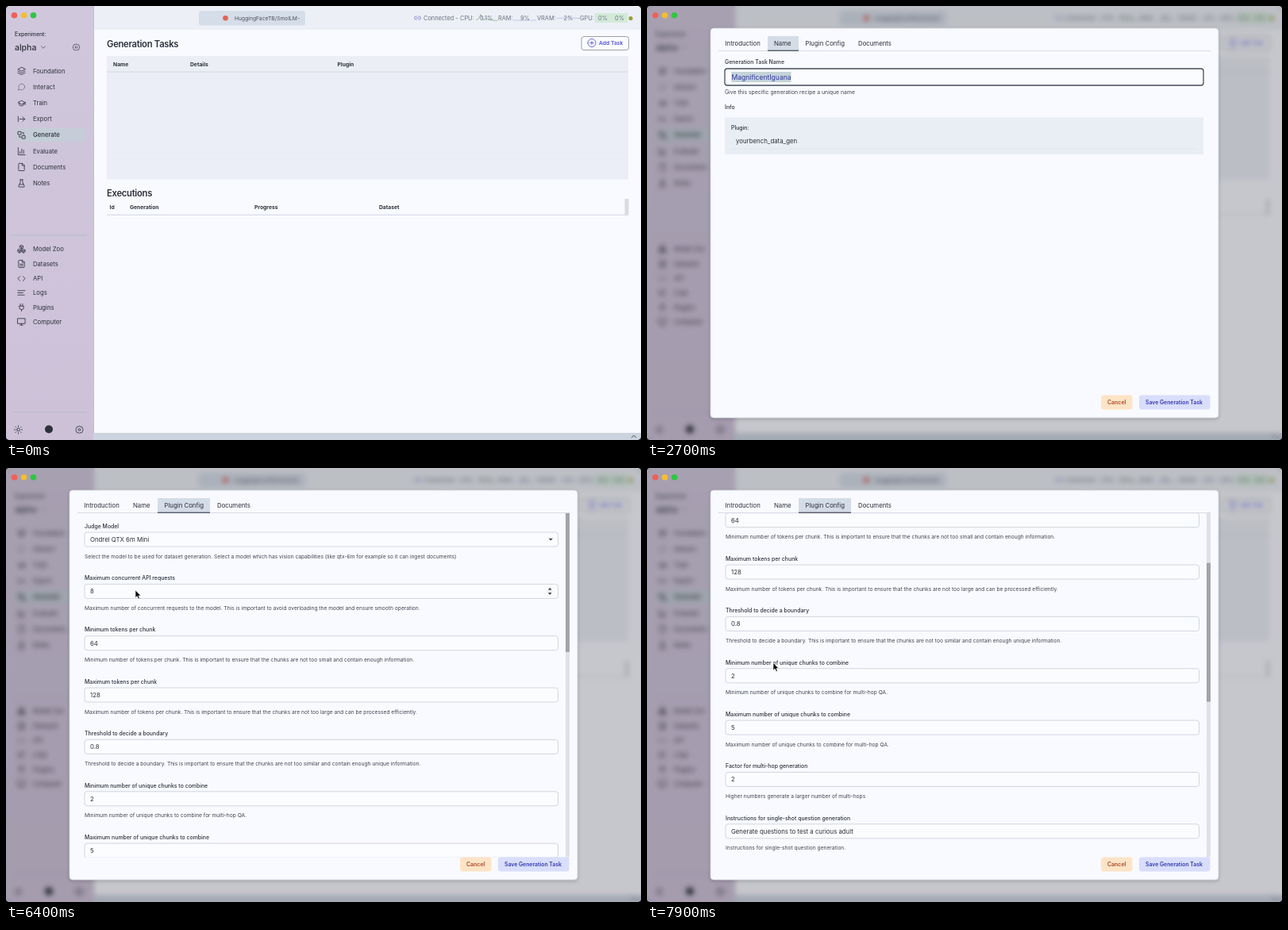
An HTML page that plays this animation: 800x547 px, repeating every 8 s.

```html
<!DOCTYPE html>
<html lang="en">
<head>
<meta charset="utf-8">
<title>Generation tasks</title>
<style>
  html, body { margin: 0; width: 100%; height: 100%; overflow: hidden; background: #26262b; }
  #stage { position: relative; width: 800px; height: 547px; overflow: hidden; border-radius: 5px; }
  #stage > * { position: absolute; left: 0; top: 0; width: 800px; height: 547px; }
  #shade { background: rgba(40, 40, 42, .24); backdrop-filter: blur(3px); }
  text { font-family: Inter, "Open Sans", sans-serif; white-space: pre; }
</style>
</head>
<body>
<div id="stage">
  <svg id="app" viewBox="0 0 800 547"></svg>
  <div id="shade"></div>
  <svg id="modal" viewBox="0 0 800 547"></svg>
  <svg id="top" viewBox="0 0 800 547"></svg>
</div>
<script>
const $ = id => document.getElementById(id);
const INK = '#2c3139', SOFT = '#40464f', MUTED = '#6c7282', PALE = '#9b9fa9';

// Text is placed by the vertical centre of its capitals.
const text = (x, y, s, size = 7.8, weight = 400, fill = INK, more = '') =>
  `<text x="${x}" y="${y + size * .36}" font-size="${size}" font-weight="${weight}" fill="${fill}" ${more}>${s}</text>`;
const label = (x, y, s) => text(x, y, s, 6.92, 500);
const heading = (x, y, s) => text(x, y, s, 11.25, 600, INK, 'letter-spacing="-.28"');
const rect = (x, y, w, h, fill, r = 0, more = '') =>
  `<rect x="${x}" y="${y}" width="${w}" height="${h}" rx="${r}" fill="${fill}" ${more}/>`;
const line = (d, stroke, w = 1, more = '') =>
  `<path d="${d}" fill="none" stroke="${stroke}" stroke-width="${w}" ${more}/>`;
const dot = (x, y, r, fill) => `<circle cx="${x}" cy="${y}" r="${r}" fill="${fill}"/>`;
const icon = (x, y, d, color = INK, k = .46) =>
  `<path transform="translate(${x - 12 * k} ${y - 12 * k}) scale(${k})" d="${d}" fill="none" stroke="${color}" stroke-width="1.8" stroke-linecap="round" stroke-linejoin="round"/>`;
const group = (id, inner, more = '') => `<g id="${id}" ${more}>${inner}</g>`;

const page = 'M14 2H6a2 2 0 0 0-2 2v16a2 2 0 0 0 2 2h12a2 2 0 0 0 2-2V8zM14 2v6h6';
const cube = (x, y) => `M${x} ${y}l4.5 2.5v5l-4.5 2.5-4.5-2.5v-5zM${x - 4.5} ${y + 2.5}l4.5 2.5 4.5-2.5M${x} ${y + 5}v5`;
const gear = 'M12 2l3 2h4l1.5 4 1.5 4-1.5 4-1.5 4h-4l-3 2-3-2H5l-1.5-4L2 12l1.5-4L5 4h4zM9 12a3 3 0 1 0 6 0 3 3 0 1 0-6 0';
const sun = 'M8 12a4 4 0 1 0 8 0 4 4 0 1 0-8 0M12 1v3M12 20v3M1 12h3M20 12h3M4 4l2 2M18 18l2 2M4 20l2-2M18 6l2-2';

const menu = [
  ['Foundation', 82, 'M12 2 2 7l10 5 10-5zM2 12l10 5 10-5M2 17l10 5 10-5'],
  ['Interact', 102, 'M21 11.5a8.4 8.4 0 0 1-9 8.4 8.5 8.5 0 0 1-3.8-.9L3 21l1.9-5.7A8.4 8.4 0 1 1 21 11.5z'],
  ['Train', 122.5, 'M22 10 12 5 2 10l10 5zM6 12v5c3 3 9 3 12 0v-5M22 10v6'],
  ['Export', 142.5, 'M3 5v14M21 12H7M15 6l6 6-6 6'],
  ['Generate', 162.5, 'M3 3h8v8H3zM14 14h8v8h-8zM6 14v4h5M14 6h4v5'],
  ['Evaluate', 183, 'M3 2v20h19M8 18v-5M13 18V6M18 18V9'],
  ['Documents', 203, page],
  ['Notes', 223.5, 'M9 2v7L4 20a1.5 1.5 0 0 0 1 2h14a1.5 1.5 0 0 0 1-2L15 9V2M8 2h8M7 15h10'],
  ['Model Zoo', 306.5, cube(12, 1) + cube(6.5, 12) + cube(17.5, 12)],
  ['Datasets', 325, page + 'M8 13h8M8 17h8'],
  ['API', 343.5, 'M8 6l-6 6 6 6M16 6l6 6-6 6'],
  ['Logs', 361.5, 'M2 6h20M2 12h14M2 18h18'],
  ['Plugins', 380, 'M9 2v6M15 2v6M6 8h12v4a6 6 0 0 1-12 0zM12 18v4'],
  ['Computer', 398, 'M2 3h20v14H2zM8 21h8M12 17v4']
];

function drawApp() {
  let s = `<defs><linearGradient id="side" x2="0" y2="1"><stop stop-color="#d0c7dc"/><stop offset="1" stop-color="#cdc1d8"/></linearGradient>
    <linearGradient id="row"><stop stop-color="#c9c9d8"/><stop offset=".3" stop-color="#c3ced7"/><stop offset="1" stop-color="#c6ccd8"/></linearGradient></defs>`;
  s += rect(0, 0, 800, 547, '#f9faff') + rect(110, 0, 690, 30, '#eceff5')
    + rect(0, 0, 110, 547, 'url(#side)') + line('M110.5 0V547', '#c3bccd');

  // Sidebar
  s += text(11, 35.5, 'Experiment:', 6.9, 500) + text(11, 52, 'alpha', 10.5, 500)
    + icon(47, 52, 'M6 9l6 6 6-6', SOFT, .4) + icon(88.5, 52, gear, SOFT, .42)
    + rect(10, 154, 91, 17, 'url(#row)', 3);
  for (const [name, y, d] of menu)
    s += icon(19.5, y, d, name === 'Interact' ? '#77757f' : INK)
      + text(34, y, name, 7.7, name === 'Generate' ? 500 : 400);
  s += line('M8 289H102M8 512H102', '#b5b9c9') + icon(15.5, 534, sun)
    + dot(54, 533.5, 5, INK) + icon(92.5, 534, gear);

  // Title bar
  s += rect(243, 6, 134, 18.5, '#d5dde8', 3) + dot(276.5, 15.3, 3.3, '#df6455')
    + text(288, 15.5, 'HuggingFaceTB/SmolLM-', 6.75, 400, '#4a505c')
    + icon(518.5, 15, 'M9 7H7a5 5 0 0 0 0 10h2M15 7h2a5 5 0 0 1 0 10h-2M8 12h8', '#6f6fc8', .4);
  s += rect(742, 9, 41, 12, '#d3ead9') + line('M592 17.5l3-1 3-6 3 7 4-2 5 2 9 1', '#8fb58f', .8)
    + line('M639 18h29M694 15.5l13-.5 17 .5', '#b9b9e4', .8);
  const stats = [[526, 'Connected -'], [572, 'CPU:'], [597, '0.1%'], [620, 'RAM:'], [648, '9%'],
    [669, 'VRAM:'], [702.5, '2%'], [723, 'GPU:'], [746, '0%'], [767, '0%']];
  for (const [x, stat] of stats) s += text(x, 15, stat, 7.4, 400, MUTED);
  s += dot(787, 15.5, 2.6, '#93a437');

  // Tables
  s += heading(127, 48, 'Generation Tasks')
    + rect(725, 38.5, 59.5, 17, '#fbfcff', 3, 'stroke="#5d6370" stroke-width=".6"')
    + icon(738, 46.5, 'M1 12a11 11 0 1 0 22 0 11 11 0 1 0-22 0M12 7v10M7 12h10', '#4c4fd0')
    + text(747, 46.5, 'Add Task', 6.75, 600, '#4c4fd8');
  s += rect(127, 63, 657, 155.5, '#ebeef7') + rect(127, 63, 657, 20, '#ebeef4') + line('M127 83H784', '#d0d7e2');
  for (let y = 91; y < 216; y += 7.8) s += line(`M127 ${y}H784`, '#e7ebf4', .6);
  const heads = [[135, 74, 'Name'], [232, 74, 'Details'], [417.5, 74, 'Plugin'], [130.5, 254, 'Id'],
    [156, 254, 'Generation'], [313, 254, 'Progress'], [470, 254, 'Dataset']];
  for (const [x, y, head] of heads) s += text(x, y, head, 6.75, 700);
  s += heading(127, 236, 'Executions')
    + line('M127 263.3H784', '#d3d8e1') + rect(779.5, 243, 5, 20.5, '#dadbdf');
  s += rect(110, 538, 690, 9, '#cbd3de') + icon(791, 542.5, 'M6 15l6-6 6 6', INK, .45);
  $('app').innerHTML = s;
}

const STEP = 65.35;
const fields = [
  ['Judge Model', '', 'Select the model to be used for dataset generation. Select a model which has vision capabilities (like qtx-6m for example so it can ingest documents)'],
  ['Maximum concurrent API requests', '8', 'Maximum number of concurrent requests to the model. This is important to avoid overloading the model and ensure smooth operation.'],
  ['Minimum tokens per chunk', '64', 'Minimum number of tokens per chunk. This is important to ensure that the chunks are not too small and contain enough information.'],
  ['Maximum tokens per chunk', '128', 'Maximum number of tokens per chunk. This is important to ensure that the chunks are not too large and can be processed efficiently.'],
  ['Threshold to decide a boundary', '0.8', 'Threshold to decide a boundary. This is important to ensure that the chunks are not too similar and contain enough unique information.'],
  ['Minimum number of unique chunks to combine', '2', 'Minimum number of unique chunks to combine for multi-hop QA.'],
  ['Maximum number of unique chunks to combine', '5', 'Maximum number of unique chunks to combine for multi-hop QA.'],
  ['Factor for multi-hop generation', '2', 'Higher numbers generate a larger number of multi-hops'],
  ['Instructions for single-shot question generation', 'Generate questions to test a curious adult', 'Instructions for single-shot question generation.']
];
const choices = [
  ['Velmor 3.7 Ballad - Please set ANTHROPIC_API_KEY in settings', true],
  ['Velmor 3.5 Rondo - Please set ANTHROPIC_API_KEY in settings', true],
  ['Ondrel QTX 6m'],
  ['Ondrel QTX 6m Mini'],
  ['Cerul Ondrel'],
  ['Custom Model API - Please set CUSTOM_MODEL_API_KEY in settings', true],
  ['Local']
];

function drawModal() {
  let s = `<defs><clipPath id="view"><rect x="90" y="57" width="620" height="433.5"/></clipPath>
    <filter id="drop" x="-5%" y="-10%" width="110%" height="125%"><feDropShadow dx="0" dy="1.5" stdDeviation="2" flood-opacity=".2"/></filter></defs>`;
  s += rect(80, 28, 640, 491, '#f9faff', 4, 'stroke="#c9ced8" stroke-width=".7" filter="url(#drop)"')
    + line('M90 56.5H710', '#d3d9e2', .9)
    + '<rect id="tab" y="38" height="18.5" fill="#d4dce7"/><rect id="mark" y="55.6" height="1.3" fill="#4b5261"/>';
  for (const [x, tab] of [[98.5, 'Introduction'], [160, 'Name'], [199.5, 'Plugin Config'], [266, 'Documents']])
    s += text(x, 47, tab);

  s += group('namePane',
    label(98, 70.5, 'Generation Task Name')
    + rect(98, 79, 603, 21, '#fbfcff', 3, 'stroke="#474d5a" stroke-width="1.3"')
    + '<rect id="sel" x="106.5" y="83" height="13" fill="#c5d3d9"/>'
    + text(106.5, 89.5, 'MagnificentIguana', 8.55, 400, INK, 'id="name"')
    + '<rect id="caret" y="83.5" width=".8" height="11.5" fill="#20242a"/>'
    + text(98, 108.7, 'Give this specific generation recipe a unique name', 6.87, 400, SOFT)
    + label(98, 127.2, 'Info')
    + rect(98, 140.5, 603, 46.5, '#e9edf4')
    + label(106, 153.5, 'Plugin:') + text(112, 170.5, 'yourbench_data_gen', 7.85)
    + line('M106 180H692', '#dde2ea', .8));

  const list = fields.map(([title, value, note], i) => {
    const y = 90 + i * STEP;
    return label(99, y - 16.7, title)
      + rect(99, y - 9, 596.5, 18, '#fbfcff', 3, `stroke="#ccd2db" stroke-width=".9" ${i ? '' : 'id="judgeBox"'}`)
      + text(106, y, value, 7.8, 400, INK, i ? '' : 'id="judge"')
      + text(99, y + 21.2, note, 6.66, 400, SOFT);
  }).join('')
    + group('clear', icon(671.5, 90, 'M6 6l12 12M18 6 6 18', SOFT, .4))
    + '<path id="arrow" d="M-2.6-1.2H2.6L0 1.6z" fill="#3c424d"/>'
    + group('spin', '<path d="M682.8 153.8l2.4-3 2.4 3zM682.8 157l2.4 3 2.4-3z" fill="#444a55"/>' + line('M681 155.4h8', '#d5d8de', .6));
  const popup = rect(99.5, 102, 596, 134, '#fbfcff', 3, 'stroke="#ccd2db" stroke-width=".7" filter="url(#drop)"')
    + '<rect id="hover" x="100" width="595" height="18.3" fill="#e7e9f3"/>'
    + choices.map(([choice, off], i) => text(107, 114.3 + i * 18.3, choice, 7.83, 400, off ? PALE : INK)).join('');
  s += group('configPane', group('', group('list', list) + group('popup', popup), 'clip-path="url(#view)"')
    + rect(705, 57, 5, 433.5, '#dfe1e6') + rect(705, 57, 5, 175, '#a2a4a9', 0, 'id="thumb"'));

  s += rect(572, 490.5, 39.5, 18, '#fde4c6', 3) + text(580, 499.7, 'Cancel', 6.95, 600, '#a94625')
    + rect(620, 490.5, 89.5, 18, '#d8defb', 3) + text(628, 499.7, 'Save Generation Task', 6.87, 600, '#3438b0');
  $('modal').innerHTML = s;
}

function drawTop() {
  const bar = 'M-2-5.5Q0-5.5 0-4V4Q0 5.5-2 5.5M2-5.5Q0-5.5 0-4M0 4Q0 5.5 2 5.5';
  $('top').innerHTML = dot(10.5, 11.7, 3.8, '#ee6159') + dot(22.5, 11.7, 3.8, '#f5bd30') + dot(34.5, 11.7, 3.8, '#2fc643')
    + group('pointer', '<path d="M0 0V9.6L2.2 7.6 3.8 11 5.4 10.3 3.9 7H6.8z" fill="#0a0a0a" stroke="#fff" stroke-width=".6"/>')
    + group('beam', line(bar, '#fff', 1.8) + line(bar, '#222', .9));
}

// When the interface changes state, in ms.
const OPEN = 1400, SELECT = 2400, CONFIG = 3500, DROP = 4400, PICK = 5300, BLUR = 6000;

// Time, then values; linear between rows.
const path = [[300, 770, 110], [600, 753, 46], [800, 753, 46], [1200, 684, 104], [1400, 684, 104], [1800, 238, 90],
  [2000, 238, 90], [2200, 166, 90], [2800, 190, 86], [3300, 222, 47], [3600, 222, 47], [4100, 155, 86], [4200, 151, 86],
  [4400, 151, 86], [4700, 175, 180], [4800, 175, 180], [5100, 171, 168], [5300, 171, 168], [5700, 168, 158],
  [5800, 168, 158], [6100, 165, 130], [6300, 165, 130], [6400, 163, 154], [6500, 155, 160], [6700, 155, 160], [7000, 159, 245.5]];
const scroll = [[7100, 0], [7900, 155]];

function at(keys, t) {
  const n = keys.findIndex(k => k[0] > t);
  if (n < 0) return keys[keys.length - 1].slice(1);
  if (!n) return keys[0].slice(1);
  const a = keys[n - 1], b = keys[n], p = (t - a[0]) / (b[0] - a[0]);
  return a.slice(1).map((v, i) => v + (b[i + 1] - v) * p);
}
const show = (id, on) => { $(id).style.display = on ? '' : 'none'; };
const set = (id, attrs) => { for (const k in attrs) $(id).setAttribute(k, attrs[k]); };

function render(t) {
  const [x, y] = at(path, t), [top] = at(scroll, t);
  const open = t >= OPEN, selected = t >= SELECT, config = t >= CONFIG;
  const popup = t >= DROP && t < PICK, picked = t >= PICK, focused = t >= DROP && t < BLUR;
  show('shade', open);
  show('modal', open);
  show('namePane', !config);
  show('configPane', config);
  const tab = config ? { x: 191, width: 66 } : { x: 152, width: 39 };
  set('tab', tab);
  set('mark', tab);

  const width = open && !config ? $('name').getComputedTextLength() : 0;
  set('name', { fill: selected ? '#3039a0' : INK });
  set('sel', { width });
  set('caret', { x: 106.8 + width });
  show('sel', selected);
  show('caret', !selected && (t - OPEN) % 1000 < 500);

  $('judge').textContent = picked ? choices[3][0] : 'Judge Model';
  set('judge', { fill: picked ? INK : '#777d88' });
  set('judgeBox', focused ? { stroke: '#515967', 'stroke-width': 1.2 } : { stroke: '#ccd2db', 'stroke-width': .9 });
  set('arrow', { transform: `translate(686.3 90) scale(1 ${popup ? -1 : 1})` });
  show('clear', t >= 4200 && t < BLUR);
  show('popup', popup);
  const row = Math.floor((y - 105) / 18.3);
  show('hover', choices[row] && !choices[row][1]);
  set('hover', { y: 105.2 + row * 18.3 });
  show('spin', picked && y > 146 && y < 165);
  set('list', { transform: `translate(0 ${-top})` });
  set('thumb', { y: 57 + top * .404 });

  const beam = t >= 1700 && t < SELECT;
  show('pointer', t >= 300 && !beam && !(selected && t < 2800));
  show('beam', beam);
  for (const id of ['pointer', 'beam']) set(id, { transform: `translate(${x} ${y})` });
}

drawApp();
drawModal();
drawTop();
const start = performance.now();
function tick() {
  const t = (performance.now() - start) % 8000;
  render(Math.floor(t / 100) * 100);
  requestAnimationFrame(tick);
}
tick();
</script>
</body>
</html>
```
